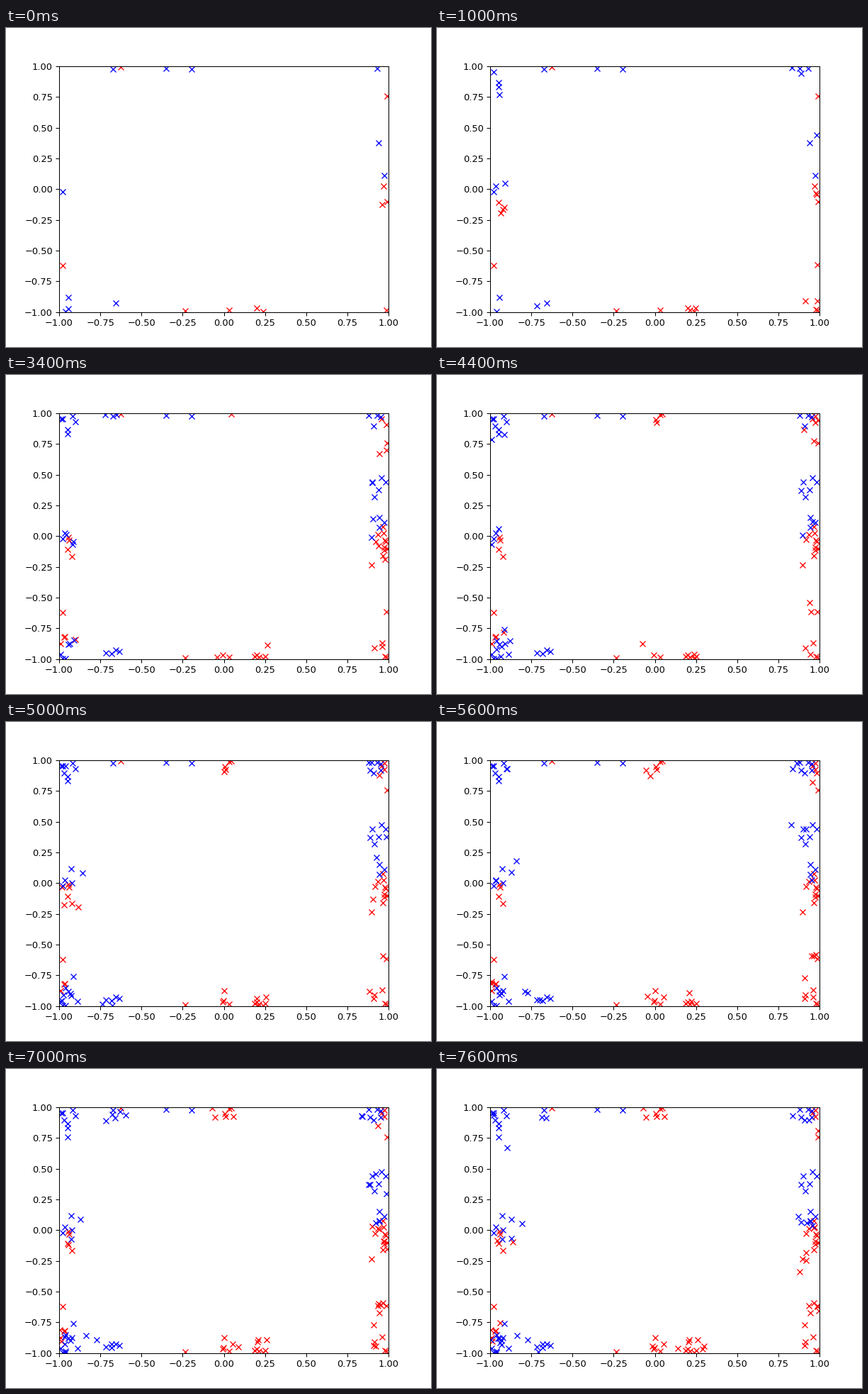
Recreate the animation shown at these times as a matplotlib script. Size 600 by 450 pixels, loop 8000 ms.

```python
import numpy as np
import matplotlib.pyplot as plt
from matplotlib.animation import FuncAnimation

STEPS = 24
TICK_MS = 200
TICKS = 40
STEP_IN_SECOND = (0, 0, 1, 2, 2)   # three uneven steps per five ticks
REACH = 17                         # longest branch along each axis, in pixels

# Seeds in stage pixels: bare ones stay alone, growing ones gather a cluster,
# sprouts appear one after another and then gather a cluster too.
BLUE = dict(
    bare=[(226, 57), (262, 58)],
    growing=[(151, 58), (524, 57), (526, 162), (534, 208),
             (80, 231), (88, 380), (84, 400), (155, 388)],
    sprouts=[(80, 62)],
)
RED = dict(
    bare=[(162, 55), (253, 399), (80, 335)],
    growing=[(538, 96), (533, 223), (538, 245), (315, 398),
             (354, 395), (363, 400), (537, 398)],
    sprouts=[(87, 246), (537, 334), (77, 379), (530, 62), (318, 55)],
)


def to_data(points):
    x, y = np.array(points, float).T
    return (x - 307.5) / 232.5, (227.25 - y) / 173.25


def branch(clusters, rng):
    """Step off a random member of a random cluster, staying inside the box."""
    cluster = clusters[rng.integers(len(clusters))]
    while True:
        x, y = cluster[rng.integers(len(cluster))] + rng.uniform(-REACH, REACH, 2)
        if 76 <= x <= 539 and 55 <= y <= 400:
            return cluster, (x, y)


def grow(bare, growing, sprouts, seed):
    """Positions at every step: clusters gain two points, walkers come and go."""
    rng = np.random.default_rng(seed)
    clusters = [[point] for point in growing]
    history = []
    for step in range(STEPS):
        if 2 <= step < 2 + len(sprouts):
            clusters.append([sprouts[step - 2]])
        if step:
            for _ in range(2):
                cluster, point = branch(clusters, rng)
                cluster.append(point)
        walkers = [branch(clusters, rng)[1] for _ in range(min(1 + step, 10))]
        history.append(to_data(bare + sum(clusters, []) + walkers))
    return history


blue_history = grow(**BLUE, seed=4)
red_history = grow(**RED, seed=9)

fig, ax = plt.subplots(figsize=(6.4, 4.8), dpi=93.75)
ax.set_xlim(-1, 1)
ax.set_ylim(-1, 1)
red_marks, = ax.plot([], [], "rx")
blue_marks, = ax.plot([], [], "bx")


def update(tick):
    step = tick // 5 * 3 + STEP_IN_SECOND[tick % 5]
    red_marks.set_data(*red_history[step])
    blue_marks.set_data(*blue_history[step])
    return red_marks, blue_marks


anim = FuncAnimation(fig, update, frames=TICKS, interval=TICK_MS,
                     repeat=True, repeat_delay=0)
plt.show()
```
